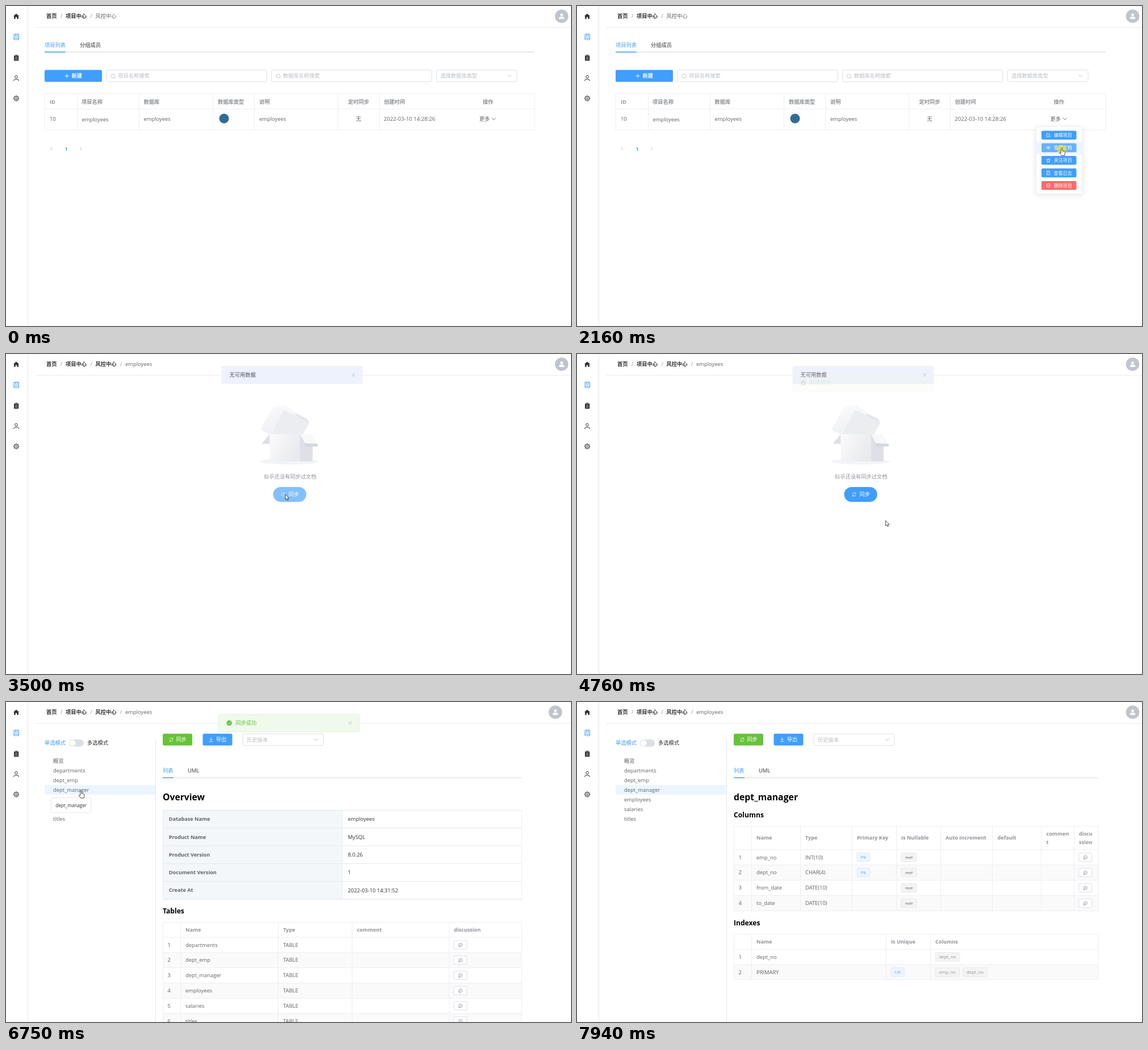
Write an HTML page that moves like this. It is 995 by 563 pixels and loops after 8.28 s.

```html
<!DOCTYPE html>
<html lang="zh-CN">
<head>
<meta charset="utf-8">
<style>
html, body { margin: 0; width: 100%; height: 100%; overflow: hidden; background: #fff; }
svg { display: block; width: 995px; height: 563px; }
text { font-family: "Open Sans", "Noto Sans CJK SC", "Noto Sans CJK", sans-serif; white-space: pre; }
</style>
</head>
<body>
<svg id="stage" viewBox="0 0 995 563"></svg>
<script>
const BLUE = '#409eff', GREEN = '#67c23a', INK = '#303133', GRAY = '#606266', MUTED = '#909399',
  PALE = '#b9bcc4', LINE = '#ebeef5', EDGE = '#dcdfe6';

// Drawing helpers; text is placed by its vertical centre.
const text = (x, y, s, fill = GRAY, { size, bold, extra = '' } = {}) => {
  size ??= /[^\x00-\x7f]/.test(s) ? 9.25 : bold ? 9.15 : 9.4;
  return `<text x="${x}" y="${y + size * .36}" font-size="${size}" fill="${fill}" ${bold ? 'font-weight="700"' : ''} ${extra}>${s}</text>`;
};
const bold = (x, y, s, fill = MUTED, size) => text(x, y, s, fill, { size, bold: true });
const rect = (x, y, w, h, fill, stroke = 'none', r = 0, extra = '') =>
  `<rect x="${x}" y="${y}" width="${w}" height="${h}" rx="${r}" fill="${fill}" stroke="${stroke}" ${extra}/>`;
const path = (d, stroke, width = 1, fill = 'none') =>
  `<path d="${d}" stroke="${stroke}" stroke-width="${width}" fill="${fill}"/>`;
const poly = (points, fill) => `<polygon points="${points}" fill="${fill}"/>`;
const circle = (x, y, r, fill, stroke = 'none', width = 1) =>
  `<circle cx="${x}" cy="${y}" r="${r}" fill="${fill}" stroke="${stroke}" stroke-width="${width}"/>`;
const hline = (x, y, x2, c = LINE, w = 1) => path(`M${x} ${y}H${x2}`, c, w);
const group = (id, ...parts) => `<g id="${id}">${parts.join('')}</g>`;
const at = (x, y, s) => `<g transform="translate(${x} ${y})">${s}</g>`;

const chevron = (x, y, c = PALE) => path(`M${x - 3.5} ${y - 1.7}l3.5 3.5l3.5-3.5`, c, .9);
const search = (x, y) => circle(x, y, 3.5, 'none', PALE, .8) + path(`M${x + 2.5} ${y + 2.7}l1.6 1.5`, PALE, .8);
const refresh = (x, y, c = '#fff') => at(x, y,
  path('M-3-.6A3 3 0 0 1 2.5-1.7M3 .6A3 3 0 0 1-2.5 1.7M2.7-3.4V-1.4H.8M-2.7 3.4V1.4H-.8', c, .8));
const cross = (x, y) => path(`M${x - 3} ${y - 3}l6 6m0-6l-6 6`, PALE, .8);
const input = (x, y, w, label, icon) =>
  rect(x, y, w, 20.5, '#fff', EDGE, 2.5) + (icon ? search(x + 12, y + 10.5) : chevron(x + w - 13, y + 10)) +
  text(x + (icon ? 20.5 : 7), y + 10.2, label, PALE);
const button = (x, fill, label, icon) => rect(x, 55.8, 52, 20.8, fill, 'none', 2.5) + icon + text(x + 23.3, 66, label, '#fff');
const remark = (x, y) => rect(x, y - 7.5, 23, 15, '#fff', EDGE, 1.5) +
  circle(x + 11.7, y, 3.1, 'none', MUTED, .8) + path(`M${x + 10} ${y}h3.4M${x + 9.3} ${y + 1.5}l-.6 2l2-.4`, MUTED, .8);
const tag = (x, y, w, label, blue, extra) =>
  rect(x, y - 7.7, w, 15.4, blue ? '#ecf5ff' : '#f4f4f5', blue ? '#d9ecff' : '#e9e9eb', 2) +
  text(x + w / 2, y, label, blue ? '#53a8ff' : MUTED, { size: 7.9, extra: 'text-anchor="middle" ' + (extra || '') });

// Grid with a header, column borders and optionally striped rows.
const grid = (x, y, right, head, rowH, rows, cols, striped) => {
  const bottom = y + head + rowH * rows;
  let s = '';
  for (let i = 0; i < rows; i++) {
    const top = y + head + rowH * i;
    if (striped && i % 2) s += rect(x, top, right - x, rowH, '#fafafa');
    s += hline(x, top, right);
  }
  return s + path(`M${x} ${y}H${right}V${bottom}H${x}Z` + cols.map(c => `M${c} ${y}V${bottom}`).join(''), LINE);
};

const shell = () => {
  const crumbs = bold(71, 18, '首页', INK) + bold(105, 18, '项目中心', INK) +
    [96, 148.5].map(x => text(x, 18, '/', MUTED)).join('');
  const teeth = [...Array(8)].map((_, i) => `<path d="M0-3.6V-5" transform="rotate(${i * 45})" stroke="${INK}" stroke-width="1.6"/>`).join('');
  return path('M38.5 0V563', '#e4e4e6') + hline(51, 37.5, 995, '#ececee') + crumbs +
    path('M18 13.5l5 4.3h-1.1v4.9h-2.6v-3.3h-2.6v3.3h-2.6v-4.9H13z', 'none', 0, INK) +
    path('M14 49.5h8.5v9.6H14zM14 56.6h8.5M16.5 49.5v4.3l1.8-1.2l1.8 1.2v-4.3', BLUE, 1) +
    rect(14, 87, 8.2, 9.3, INK, 'none', .8) + rect(16, 85.7, 4.2, 2.4, INK, '#fff', .5, 'stroke-width=".5"') +
    path('M15.8 91h4.6M15.8 93.5h4.6', '#fff', .7) +
    circle(18, 124.7, 2.3, 'none', INK, 1) + path('M13.7 132v-.8q0-2.2 2.4-2.2h3.8q2.4 0 2.4 2.2v.8', INK, 1) +
    at(18, 162.5, teeth + circle(0, 0, 3.7, '#fff', INK, 1) + circle(0, 0, 1.5, 'none', INK, .9)) +
    group('avatar', circle(978.5, 18, 11.8, '#c0c4cc'), circle(978.5, 15.4, 2.5, '#fff'),
      path('M973.7 22.7q0-4 3-4h3.6q3 0 3 4z', 'none', 0, '#fff'));
};

const listPage = () => {
  const heads = [[77, 'ID'], [133, '项目名称'], [242.5, '数据库'], [373, '数据库类型'], [446, '说明'],
    [602.5, '定时同步'], [665.5, '创建时间'], [839.5, '操作']];
  const items = ['编辑项目', '查看文档', '关注项目', '查看日志', '删除项目'];
  const icons = ['M2.8-.5V3H-3V-3H.5M-1 1L3-3', 'M-3.6 0Q0-4.5 3.6 0Q0 4.5-3.6 0zM-1 0a1 1 0 1 0 2 0a1 1 0 1 0-2 0',
    'M0-3.5L1-1.1L3.5-.9L1.6.8L2.2 3.3L0 2L-2.2 3.3L-1.6.8L-3.5-.9L-1-1.1z', 'M-2.6-3.3H2.6V3.3H-2.6zM-1-1.2H1M-1 1.2H.2',
    'M-3.3 0a3.3 3.3 0 1 0 6.6 0a3.3 3.3 0 1 0-6.6 0M-1.6 0H1.6'];
  const menu = items.map((label, i) => {
    const y = 227.2 + 22.15 * i;
    return `<rect class="itemBg" x="808.5" y="${y - 11}" width="81" height="22.2" fill="#ecf5ff"/>` +
      rect(818, y - 7.8, 61.5, 15.6, i == 4 ? '#f56c6c' : BLUE, 'none', 2, 'class="itemBtn"') +
      at(830, y, path(icons[i], '#fff', .8)) + text(839.7, y, label, '#fff', { size: 8 });
  }).join('');
  return text(157.5, 18, '风控中心') + text(68, 69, '项目列表', BLUE) + text(130, 69, '分组成员', INK) +
    hline(68, 81, 931, '#dfe2e8', 1.3) + hline(68, 81, 104.5, BLUE, 1.5) +
    rect(68, 112.5, 101, 21, BLUE, 'none', 2.5) + path('M103.5 123h7.4m-3.7-3.7v7.4', '#fff', .9) +
    text(115.5, 122.7, '新建', '#fff', { bold: true }) +
    input(176.8, 112.7, 282.5, '项目名称搜索', true) + input(467.3, 112.7, 282.5, '数据库名称搜索', true) +
    input(758, 112.7, 142, '选择数据库类型') +
    rect(68, 181, 863, 37, '#f5f7fa', 'none', 0, 'id="rowHover"') +
    grid(68, 154.5, 931, 26.5, 37, 1, [125.5, 234.5, 364.5, 437.5, 584.5, 657.5]) +
    heads.map(([x, s]) => bold(x, 168.3, s)).join('') +
    text(77, 199, '10') + text(133.5, 200, 'employees') + text(242.5, 199, 'employees') + circle(384, 198, 8.5, '#2f6d97') +
    text(446, 199, 'employees') + text(616.3, 199, '无') + text(665.3, 199, '2022-03-10 14:28:26', GRAY, { size: 9.6 }) +
    text(833.5, 199, '更多') + chevron(859, 198.5, GRAY) +
    path('M81.5 248l-3 3l3 3M130 248l3 3l-3 3', PALE, .9) + bold(103.5, 251.3, '1', BLUE) +
    group('menu', rect(808, 212.3, 82, 118.5, '#fff', '#e8ebf0', 2.5, 'filter="url(#shadow)"'),
      path('M845 212.5l4-4l4 4', '#e4e7ed', .8, '#fff'), menu);
};

const emptyPage = () =>
  `<ellipse cx="499" cy="189.3" rx="52" ry="5" fill="#f3f4f8"/>` +
  poly('448,133 467,98 474,92 491,90 512,104 509,111 489,99 465,142', 'url(#lid)') +
  poly('489,99 529,114 534,121 523,142 466,141', '#ecedf1') +
  poly('490,90 512,104 530,114 489,99', '#f6f7f9') + poly('509,104 530,114 534,121 512,109', '#e4e5eb') +
  poly('464.5,141 464.5,158.5 450.5,157.5', '#dfe0e7') +
  rect(464.5, 141, 53.5, 47.7, 'url(#front)') + poly('518,141 540,157 540,188.7 518,188.7', '#dfe0e7') +
  poly('518,141 538,142 549.5,159 527,158.5', '#f7f8fa') + poly('525,157 549,158 549,162.5 528,163.5', '#d5d7de') +
  text(454, 215.3, '似乎还没有同步过文档', MUTED) +
  rect(470.5, 234, 58.3, 26.2, BLUE, 'none', 13.1, 'id="syncBtn"') + group('syncIcon', refresh(488, 247)) +
  at(488, 247, group('spinner', ...[...Array(8)].map((_, i) =>
    `<path d="M0-2V-3.8" transform="rotate(${i * 45})" stroke="#fff" stroke-width=".8"/>`))) +
  text(497.5, 246.8, '同步', '#fff');

const tables = ['departments', 'dept_emp', 'dept_manager', 'employees', 'salaries', 'titles'];

const docFrame = () =>
  text(68, 72, '单选模式', BLUE) + rect(111, 66, 26, 12.5, EDGE, 'none', 6.2) + circle(117.3, 72.2, 5.2, '#fff') +
  text(143, 72, '多选模式', INK) + rect(68, 146, 195, 17, '#ecf5ff', 'none', 0, 'id="treeHover"') +
  ['概览', ...tables].map((s, i) => text(83, 104 + 16.9 * i, s)).join('') + path('M263.5 65V563', '#e2e4ea') +
  button(276, GREEN, '同步', refresh(291, 66.3)) +
  button(346.5, BLUE, '导出', path('M361.3 62.3v5.2m-2.4-2.4l2.4 2.4l2.4-2.4M357.7 69.6h7.2', '#fff', .8)) +
  input(417, 56, 142, '历史版本') + text(276, 121, '列表', BLUE) + text(320, 121, 'UML', INK);

const tabLine = right => hline(276, 133.3, right, '#e2e4ea', 1.2) + hline(276, 133.3, 295, BLUE, 1.5);

const overview = () => {
  const facts = [['Database Name', 'employees'], ['Product Name', 'MySQL'], ['Product Version', '8.0.26'],
    ['Document Version', '1'], ['Create At', '2022-03-10 14:31:52']];
  const rowY = i => 427.3 + 26.8 * i;
  return tabLine(908) + bold(276, 167, 'Overview', '#000', 15.7) + rect(276, 190.5, 316, 156.5, '#f3f7fa') +
    path('M276.5 190.5H908V347H276.5zM592.5 190.5V347', LINE) +
    facts.map(([k, v], i) => hline(276, 190.5 + 31.3 * i, 908, '#e4e8f0') + bold(286.8, 206 + 31.3 * i, k, GRAY) +
      text(602, 206 + 31.3 * i, v, INK)).join('') + hline(276, 347, 908, '#e4e8f0') +
    bold(276, 367.7, 'Tables', '#000', 12.1) +
    grid(276.5, 387.5, 908, 26.5, 26.8, 7, [307.5, 479.5, 609.5, 780.5], true) +
    [[316, 'Name'], [488, 'Type'], [618, 'comment'], [788.7, 'discussion']].map(([x, s]) => bold(x, 401, s)).join('') +
    tables.map((s, i) => text(284.5, rowY(i), i + 1) + text(316, rowY(i), s) + text(488, rowY(i), 'TABLE') +
      remark(788.7, rowY(i))).join('');
};

const detail = () => {
  const heads = [[316, 'Name'], [402, 'Type'], [493, 'Primary Key'], [571, 'Is Nullable'], [649, 'Auto Increment'], [740.5, 'default']];
  const fields = [['emp_no', 'INT(10)'], ['dept_no', 'CHAR(4)'], ['from_date', 'DATE(10)'], ['to_date', 'DATE(10)']];
  return tabLine(918) + bold(276, 167, 'dept_manager', '#000', 15.8) + bold(276, 198.3, 'Columns', '#000', 12.2) +
    grid(276.5, 218.5, 918, 41.3, 26.9, 4, [307.5, 393.5, 484.5, 562.5, 640.5, 731.5, 817.5, 875.5], true) +
    heads.map(([x, s]) => bold(x, 239, s)).join('') +
    bold(826.5, 231.7, 'commen') + bold(826.5, 246.7, 't') + bold(884, 231.7, 'discu') + bold(884, 246.7, 'ssion') +
    fields.map(([name, type], i) => {
      const y = 273.2 + 26.9 * i;
      return text(284.5, y, i + 1) + text(316, y, name) + text(402, y, type) + (i < 2 ? tag(493, y, 22.5, 'PK', true) : '') +
        tag(571, y, 27, 'null', false, 'font-style="italic" text-decoration="line-through"') + remark(883.7, y);
    }).join('') +
    bold(276, 388.5, 'Indexes', '#000', 12.1) + grid(276.5, 408.5, 918, 26.6, 26.8, 2, [307.5, 544.5, 622.5], true) +
    bold(316, 422, 'Name') + bold(553, 422, 'Is Unique') + bold(631, 422, 'Columns') +
    text(284.5, 448.5, '1') + text(316, 448.5, 'dept_no') + tag(631, 448.5, 43, 'dept_no') +
    text(284.5, 475.2, '2') + text(316, 475.2, 'PRIMARY') + tag(553, 475.2, 23.5, 'UK', true) +
    tag(631, 475.2, 42.5, 'emp_no') + tag(679.5, 475.2, 43, 'dept_no');
};

// Messages are drawn around y = 0 and moved into place.
const messages = () =>
  group('info', rect(0, -15.2, 247.7, 30.3, '#edf2fc', LINE, 2.5), text(13.5, 0, '无可用数据', '#505358'), cross(232, 0)) +
  group('success', rect(0, -15.5, 247.7, 31, '#f0f9eb', '#e1f3d8', 2.5), circle(18.8, 0, 4.7, GREEN),
    path('M16.6 .1l1.6 1.6l3-3.1', '#fff', .9), text(30, 0, '同步成功', GREEN), cross(231.8, 0));

const $ = id => document.getElementById(id);
$('stage').innerHTML = `<defs>
  <linearGradient id="front" x2="1" y2=".5"><stop stop-color="#fbfbfc"/><stop offset="1" stop-color="#e9eaee"/></linearGradient>
  <linearGradient id="lid" x2=".5" y2="1"><stop stop-color="#fcfcfd"/><stop offset="1" stop-color="#eeeff3"/></linearGradient>
  <filter id="shadow" x="-20%" y="-20%" width="140%" height="140%"><feDropShadow dx="0" dy="1.5" stdDeviation="4" flood-opacity=".1"/></filter>
</defs>` + shell() + group('list', listPage()) +
  group('doc', bold(157.5, 18, '风控中心', INK), text(201, 18, '/', MUTED), text(210, 18, 'employees')) +
  group('empty', emptyPage()) + group('frame', docFrame()) + group('overview', overview()) + group('detail', detail()) +
  group('tip', rect(79.3, 168.3, 70.4, 26.4, '#fff', '#e4e7ed', 2.5), path('M111 168.3l3.3-3.3l3.3 3.3', '#e4e7ed', .8, '#fff'),
    text(87.3, 181.7, 'dept_manager', INK, { size: 8.1 })) + messages() +
  group('pointer', group('click', '<circle cy="2.5" r="8" fill="#ffe800" opacity=".65"/>'),
    group('arrow', path('M0 0V9.2L2.1 7.3L3.6 10.6L5.1 9.9L3.7 6.8H6.4Z', '#222', .8, '#fff')),
    group('hand', path('M-1.2 1.2a1.2 1.2 0 0 1 2.4 0V5l3.6.8q1.4.4 1.2 2L5.2 13H-.2L-3.8 8.6q.6-1.6 2.6 0z', '#222', .8, '#fff')));

const LOOP = 8280, EMPTY = 2250, DOCS = 4860, DETAIL = 6960;
const track = [[110, 972, 524], [880, 852, 197], [1050, 852, 197], [1400, 852, 224], [1570, 852, 224], [1820, 853.5, 250],
  [2300, 853.5, 250], [2950, 492, 247], [3560, 492, 247], [4150, 543.5, 293], [5450, 543.5, 293], [5900, 70, 188],
  [6180, 58, 150], [6400, 82, 126], [6690, 132, 156], [7060, 132, 156], [7920, 996, 568]];

const clamp = p => Math.min(1, Math.max(0, p));
const smooth = p => p * p * (3 - 2 * p);
const ease = (t, start, span = 300) => smooth(clamp((t - start) / span) ** .6);
const within = (t, a, b) => t >= a && t < b;
const show = (id, on) => $(id).setAttribute('visibility', on ? 'visible' : 'hidden');
const place = (id, x, y, opacity = 1) => {
  $(id).setAttribute('transform', `translate(${x} ${y})`);
  $(id).setAttribute('opacity', opacity);
};
const pointerAt = t => {
  const i = track.findIndex(k => k[0] > t);
  if (i < 1) return (i ? track.at(-1) : track[0]).slice(1);
  const [a, x, y] = track[i - 1], [b, x2, y2] = track[i], p = smooth((t - a) / (b - a));
  return [x + (x2 - x) * p, y + (y2 - y) * p];
};

function draw(t) {
  const [x, y] = pointerAt(t), scrolls = within(t, DOCS, DETAIL);
  $('list').style.display = t < EMPTY ? '' : 'none';
  $('doc').style.display = t >= EMPTY ? '' : 'none';
  $('empty').style.display = within(t, EMPTY, DOCS) ? '' : 'none';
  $('frame').style.display = t >= DOCS ? '' : 'none';
  $('overview').style.display = scrolls ? '' : 'none';
  $('detail').style.display = t >= DETAIL ? '' : 'none';
  place('avatar', scrolls ? -11 : 0, 0);

  // Project list with its menu.
  show('rowHover', within(t, 110, 1430) && within(y, 181, 218));
  const open = ease(t, 950) * (1 - ease(t, 2190));
  $('menu').setAttribute('opacity', open);
  $('menu').setAttribute('transform', `translate(0 ${212 * (1 - open)}) scale(1 ${Math.max(open, .001)})`);
  const hovered = Math.floor((y - 216) / 22.15);
  document.querySelectorAll('.itemBg').forEach((el, i) => el.setAttribute('opacity', t > 970 && i == hovered ? 1 : 0));
  document.querySelectorAll('.itemBtn').forEach((el, i) =>
    el.setAttribute('fill', i == 4 ? '#f56c6c' : t > 970 && i == hovered ? '#66b1ff' : BLUE));

  // Sync button.
  const loading = within(t, 3370, 4720);
  $('syncBtn').setAttribute('fill', loading ? '#83bffc' : within(t, 3040, 3370) ? '#66b1ff' : BLUE);
  $('syncIcon').style.display = loading ? 'none' : '';
  $('spinner').style.display = loading ? '' : 'none';
  $('spinner').setAttribute('transform', `rotate(${t * .18})`);

  // Tree hover and tooltip.
  const row = Math.floor((y - 95.5) / 16.9), onTree = within(t, DOCS, 7060) && within(x, 68, 263) && within(row, 0, 7);
  const marked = t >= 6690 ? 3 : row;
  $('treeHover').setAttribute('y', 95.4 + 16.9 * marked);
  $('treeHover').style.display = onTree || t >= 6690 ? '' : 'none';
  $('tip').setAttribute('opacity', ease(t, 6600, 120) * (1 - ease(t, 6960, 150)));

  // Messages.
  const left = scrolls ? 374.3 : 380;
  const infoIn = ease(t, 2290), infoOut = ease(t, 5280), okIn = ease(t, 4730), okOut = ease(t, 7720, 210);
  place('info', left, 37 - 31 * (1 - infoIn + infoOut), infoIn * (1 - infoOut));
  place('success', left, 77 - 31 * (1 - okIn + okOut) - 40 * infoOut, okIn * (1 - okOut));

  // Pointer.
  const hand = within(t, 830, EMPTY) || within(t, 3040, 3370) || onTree;
  place('pointer', x, y, within(t, 110, 7930) ? 1 : 0);
  $('hand').style.display = hand ? '' : 'none';
  $('arrow').style.display = hand ? 'none' : '';
  $('click').style.display = [2150, 3340, 6810].some(c => within(t, c, c + 130)) ? '' : 'none';
}

const start = performance.now();
(function tick() {
  draw((performance.now() - start) % LOOP);
  requestAnimationFrame(tick);
})();
</script>
</body>
</html>
```
